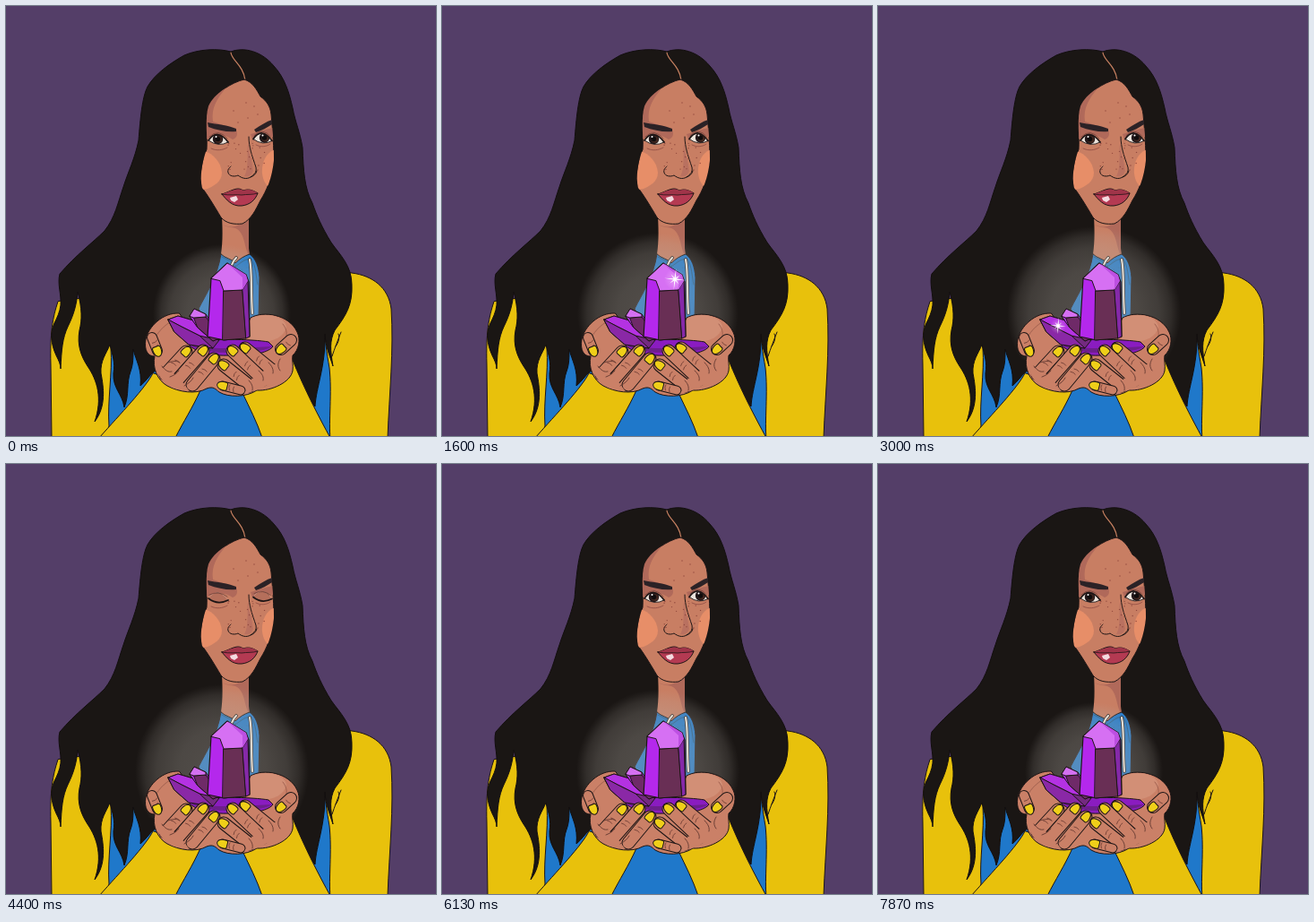
These frames come from a looping animation (480x480 px, 7940 ms). An HTML page with a canvas:

```html
<!DOCTYPE html>
<html lang="en">
<head>
<meta charset="utf-8">
<title>Crystal glow</title>
<style>
html, body { margin: 0; width: 100%; height: 100%; overflow: hidden; background: #543e68; }
canvas { display: block; width: 480px; height: 480px; }
</style>
</head>
<body>
<canvas id="stage"></canvas>
<script>
const LOOP = 7940, STEP = 1000 / 15;
const INK = '#1d1515', HAIR = '#1a1614', SKIN = '#c87e63', HAND = '#ca8067', SHADE = '#b0695a',
  WARM = '#e78e68', YELLOW = '#e8c10c', BLUE = '#1f78ca';
const canvas = document.getElementById('stage');
const ctx = canvas.getContext('2d');
const dpr = window.devicePixelRatio || 1;
canvas.width = canvas.height = 480 * dpr;
ctx.lineJoin = ctx.lineCap = 'round';

function shape(d, fill, line, width = 1) {
  const p = new Path2D(d);
  if (fill) { ctx.fillStyle = fill; ctx.fill(p); }
  if (line) { ctx.strokeStyle = line; ctx.lineWidth = width; ctx.stroke(p); }
  return p;
}
function dot(x, y, r, fill) {
  ctx.beginPath();
  ctx.arc(x, y, r, 0, Math.PI * 2);
  ctx.fillStyle = fill;
  ctx.fill();
}
const ease = u => (1 - Math.cos(Math.PI * Math.min(1, Math.max(0, u)))) / 2;

// Eased value through [time, value] keys
function track(keys, t) {
  for (let i = 1; i < keys.length; i++) {
    const [a, va] = keys[i - 1], [b, vb] = keys[i];
    if (t <= b) return va + (vb - va) * ease((t - a) / (b - a));
  }
  return keys[keys.length - 1][1];
}

const glowKeys = [[0, 0], [2700, 1], [4400, 1], [5600, 0.5], [6800, 1], [7870, 0]];
const lidKeys = [[3850, 0], [4130, 1], [4680, 1], [4960, 0], [6270, 0], [6540, 1], [6980, 1], [7200, 0]];
// [peak time, x, y, size]
const sparkles = [[1560, 260, 305, 12], [3000, 201, 357, 9], [5330, 289, 380, 9], [6930, 196, 371, 11]];

function body() {
  ctx.fillStyle = '#543e68';
  ctx.fillRect(0, 0, 480, 480);
  shape('M58 330C52 348 49 365 50 400L51 482H426C428 430 433 385 430 338C427 314 409 301 386 298L340 290Z', YELLOW, INK);
  shape('M114 350L117 382C119 410 113 440 115 469L110 482H362C360 466 364 430 361 404C358 386 355 372 357 355Z', BLUE, INK);
  shape('M374 364C370 374 367 382 364 391M371 366C373 370 371 376 368 380', null, INK);
}

function hair() {
  shape('M251 51C237 47 215 48 199 55C183 64 166 76 158 90C152 102 150 125 148 150C144 170 136 186 131 202' +
    'C125 219 122 236 110 251C97 264 78 278 60 299C57 310 62 322 61 334C60 342 57 348 54 354C49 364 50 377 56 390C59 396 61 400 61 405' +
    'C62 383 63 371 69 358C76 344 79 332 80 319C85 338 85 350 82 362C79 379 84 391 91 402' +
    'C102 418 108 438 99 464C112 447 109 426 106 410C105 396 112 388 116 378C119 390 122 398 120 410' +
    'C119 427 130 433 132 448C138 434 134 421 139 408C142 400 142 392 142 383C145 396 152 405 150 424' +
    'C155 420 160 413 165 408L318 395C325 415 333 434 345 447C346 426 357 402 356 366' +
    'C357 382 361 389 365 402C362 384 361 374 367 362C380 345 387 333 386 311' +
    'C386 290 373 278 363 264C352 246 347 234 342 220C333 203 332 184 331 158C328 140 323 130 320 114' +
    'C316 96 311 80 299 67C286 51 266 45 251 51Z', HAIR, '#120e0e');
  shape('M251 52C252 61 265 66 267 83', null, '#c98262', 1.2);
}

function neck() {
  shape('M241 234C242 254 242 267 239 283L258 292L273 283C270 270 270 255 271 232Z', SKIN);
  shape('M242 244C252 249 261 247 271 233L271 278C266 270 267 255 258 249C253 246 247 248 242 244Z', SHADE);
  shape('M240 277C245 282 252 282 256 287C261 282 266 279 272 277C279 282 282 291 283 303L282 350H222L215 338C223 322 236 303 240 277Z', BLUE, INK);
  shape('M241 280C248 284 254 285 256 291M256 291C263 286 268 281 274 283C279 290 279 302 281 311', null, '#225b87');
  for (let i = 0; i < 24; i++) dot(245 + i % 6 * 6, 292 + Math.floor(i / 6) * 4 + i % 2 * 2, 0.5, '#2b659c');
  const cords = 'M257 281C254 284 253 286 252 289M272 283C275 297 273 317 275 343';
  shape(cords, null, INK, 3.6);
  shape(cords, null, '#eee9df', 2.2);
}

function face() {
  const head = shape('M266 82C252 85 232 98 226 112C222 124 225 145 224 160C219 174 216 190 219 203' +
    'C225 211 233 224 240 236C246 243 255 244 264 243C274 238 279 227 284 217C291 206 297 192 299 172' +
    'C299 158 298 143 296 121C295 112 291 106 284 101C280 94 276 85 266 82Z', SKIN, INK);
  ctx.save();
  ctx.clip(head);
  shape('M220 120C228 104 236 97 246 91C235 104 229 114 231 129L257 138C259 143 258 147 253 149C244 143 232 143 222 150Z', SHADE);
  shape('M273 143C280 141 290 137 299 136V147C290 141 282 142 276 151Z', SHADE);
  shape('M222 162C231 165 240 174 241 186C241 196 232 201 225 204L214 206Z', WARM);
  shape('M301 160C290 163 285 175 286 187C287 195 290 199 292 201L303 190Z', WARM);
  shape('M270 152C271 163 275 174 276 184C274 190 269 191 266 190C271 182 269 167 270 152Z', '#b97160');
  ctx.restore();
  shape('M225 130C235 132 248 133 257 137L257 140C248 141 236 139 226 135Z', '#2b2226');
  shape('M277 138C284 133 291 129 297 127L297 132C291 136 286 139 279 141Z', '#2b2226');
  shape('M271 146C271 158 275 168 279 180C280 186 277 188 273 191C268 194 263 192 259 189' +
    'C255 191 249 190 248 186C247 183 249 181 251 179M273 191C276 190 279 188 280 184', null, INK);
  shape('M229 159C235 162 242 161 247 158M279 155C285 158 291 157 295 154', null, '#8e4c43', 0.8);
  for (let i = 0; i < 27; i++) {
    const side = i % 3 === 0 ? 281 : 261;
    dot(side + Math.sin(i * 5.1) * (side > 270 ? 8 : 14), 168 + Math.cos(i * 3.7) * 15, 0.7, '#91493e');
  }
  for (const [x, y] of [[254, 117], [268, 108], [270, 125], [281, 121], [259, 130], [277, 112]]) dot(x, y, 0.7, '#91493e');
  shape('M241 210C248 208 254 204 259 204C262 204 263 205 265 206C270 204 275 205 281 209C278 217 272 222 263 223C252 224 246 216 241 210Z', '#b43a52', INK);
  shape('M241 210C250 211 258 210 263 211C270 210 275 210 281 209C276 205 270 204 265 206C260 203 252 206 241 210Z', '#a03449');
  shape('M241 210C250 212 257 210 263 211C269 210 275 211 281 209', null, INK, 0.8);
  shape('M250 214L257 212L259 216L255 219L251 217Z', '#f4dbe0');
}

function eye(x, y, w, look, c) {
  const top = y - 7 + c * 12;
  const almond = shape(`M${x - w} ${y + 1}Q${x - 1} ${y - 13} ${x + w} ${y + 3}Q${x} ${y + 9} ${x - w} ${y + 1}Z`, '#ece4dc');
  ctx.save();
  ctx.clip(almond);
  dot(x + look, y - 0.5, 5.7, '#21171a');
  dot(x + look + 1, y, 3.8, '#43271f');
  dot(x + look, y - 0.5, 2.8, '#100c0d');
  dot(x + look - 2, y - 3, 1, '#fff');
  if (c > 0) shape(`M${x - w - 2} ${y - 15}H${x + w + 2}V${y + 3}Q${x} ${top + 5} ${x - w - 2} ${y + 2}Z`, '#b56f5b');
  ctx.restore();
  const bend = y - 13 + c * 22;
  shape(`M${x - w} ${y + 1}Q${x - 1} ${bend} ${x + w} ${y + 3}`, null, INK, 1.7);
  if (c < 1) shape(`M${x - w} ${y + 1}Q${x} ${y + 9} ${x + w} ${y + 3}`, null, INK, 0.9);
  shape(`M${x - w + 1} ${y - 3}Q${x} ${y - 13 + c * 5} ${x + w - 1} ${y - 1}`, null, '#704039', 0.8);
}

function glow(v) {
  const r = 77 + 20 * v, y = 343;
  const g = ctx.createRadialGradient(241, y, 0, 241, y, r);
  for (const [p, k] of [[0, 1], [0.5, 0.88], [0.75, 0.68], [0.88, 0.4], [0.96, 0.12], [1, 0]])
    g.addColorStop(p, `rgba(185,180,172,${0.36 * k})`);
  ctx.fillStyle = g;
  ctx.fillRect(120, 235, 245, 160);
}

function finger(x1, y1, x2, y2, w) {
  const d = `M${x1} ${y1}L${x2} ${y2}`;
  shape(d, null, INK, w + 2);
  shape(d, null, HAND, w);
  const a = Math.atan2(y2 - y1, x2 - x1);
  ctx.save();
  ctx.translate((x1 + x2) / 2, (y1 + y2) / 2);
  ctx.rotate(a);
  shape('M-3 -4Q-1 -1 -2 2M2 -3Q4 0 3 3', null, '#6e3d34', 0.8);
  ctx.restore();
  ctx.save();
  ctx.translate(x2, y2);
  ctx.rotate(a);
  shape('M-5 -3Q-5 -5 0 -4.6Q6 -4 6.5 0Q6 4 0 4.6Q-5 5 -5 3Z', '#efcf19', INK);
  ctx.restore();
}

function sleeves() {
  shape('M164 410C156 426 128 455 104 482H189C198 464 208 449 217 429Z', YELLOW, INK);
  shape('M264 432C272 449 280 464 286 482H362C350 460 334 430 319 393Z', YELLOW, INK);
}

function palms() {
  shape('M193 343C175 342 159 358 156 372C154 384 158 391 166 391C163 403 169 418 180 424C193 431 212 434 224 427' +
    'C232 424 234 428 238 431C248 437 268 437 280 429C296 430 318 420 320 407C321 400 319 396 320 390' +
    'C327 384 329 372 325 364C316 344 287 340 273 348L262 372H215Z', HAND, INK);
  shape('M273 349C288 341 311 345 313 358C310 371 296 377 272 374Z', '#d28f76');
  shape('M183 353C173 359 166 369 163 378M309 355C314 361 315 369 310 374', null, '#96594a', 0.8);
}

function crystals() {
  shape('M203 377C220 370 278 372 293 375L298 380C294 386 278 391 250 390C230 391 211 387 203 377Z', '#8a1cc0', INK);
  shape('M205 378C226 384 259 382 297 380C286 389 222 391 205 378Z', '#6d1f8c');
  shape('M181 350L192 346L209 351L238 373L231 382L204 378L188 364Z', '#732a80', INK);
  shape('M181 350L192 346L209 351L238 373L216 368L196 358Z', '#b432e2', INK);
  shape('M181 350L196 358L216 368L231 382L204 378L188 364Z', '#8a28a6', INK);
  shape('M205 346L210 338L223 344L240 370L231 374L214 359Z', '#b02fe0', INK);
  shape('M210 348L223 347L240 370L231 374L214 359Z', '#6f2a68', INK);
  shape('M205 346L210 338L223 344L223 347L210 348Z', '#d470f2', INK);
  shape('M229 304L247 287L268 300L271 308L272 369L244 373L225 369Z', '#b428ec', INK, 1.2);
  shape('M243 318L264 317L268 371L242 373Z', '#692f55', INK);
  shape('M264 317L270 307L272 369L268 371Z', '#8529a8', INK);
  shape('M229 304L247 287L268 300L264 317L243 318L239 307Z', '#d670f3', INK);
  shape('M247 287L268 300L270 307L264 317L264 303Z', '#bd50e2');
}

function fingers() {
  finger(163, 370, 169, 385, 10);
  finger(318, 373, 307, 383, 12);
  finger(178, 411, 201, 386, 13);
  finger(191, 418, 220, 385, 13);
  finger(208, 423, 232, 394, 13);
  finger(299, 408, 267, 382, 13);
  finger(287, 417, 253, 385, 13);
  finger(272, 424, 243, 401, 13);
  finger(262, 429, 242, 424, 9);
  // Covers the finger roots where they meet each hand
  shape('M168 404C170 415 178 423 188 427L204 429L192 413L176 404Z', HAND);
  shape('M266 433C279 430 290 424 303 418L316 407L306 397L288 407L272 418Z', HAND);
  shape('M174 402C178 407 181 409 185 408M183 414C188 412 190 411 193 407M199 424C204 421 207 419 209 415' +
    'M293 398C297 402 299 406 298 410M282 407C286 411 288 414 287 418M271 418C274 421 276 425 275 429' +
    'M181 398C187 396 192 396 194 398M306 394C303 399 303 403 306 407', null, '#613830', 0.9);
}

function sparkle(t, [peak, x, y, size]) {
  const u = 1 - Math.abs(t - peak) / 360;
  if (u <= 0) return;
  const k = ease(u * 1.3), r = size * k;
  const halo = ctx.createRadialGradient(x, y, 0, x, y, r);
  halo.addColorStop(0, `rgba(255,225,255,${0.4 * k})`);
  halo.addColorStop(1, 'rgba(255,200,255,0)');
  dot(x, y, r, halo);
  ctx.save();
  ctx.translate(x, y);
  ctx.rotate((t - peak) / 1200 + 0.08);
  ctx.fillStyle = '#fff';
  for (let i = 0; i < 8; i++) {
    const len = i % 2 ? r * 0.6 : r;
    ctx.beginPath();
    ctx.moveTo(0, -0.8);
    ctx.lineTo(len, 0);
    ctx.lineTo(0, 0.8);
    ctx.fill();
    ctx.rotate(Math.PI / 4);
  }
  ctx.restore();
  dot(x, y, 1.5 * k, '#fff');
}

function draw(now) {
  const t = Math.floor((now % LOOP + 4) / STEP) * STEP;
  const lid = track(lidKeys, t);
  ctx.setTransform(dpr, 0, 0, dpr, 0, 0);
  body();
  hair();
  neck();
  face();
  eye(237, 149, 11, -0.5, lid);
  eye(286.5, 147.5, 10.5, 2, lid);
  glow(track(glowKeys, t));
  sleeves();
  palms();
  crystals();
  fingers();
  for (const s of sparkles) sparkle(t, s);
}

const start = performance.now();
function tick() {
  draw(performance.now() - start);
  requestAnimationFrame(tick);
}
tick();
</script>
</body>
</html>
```
